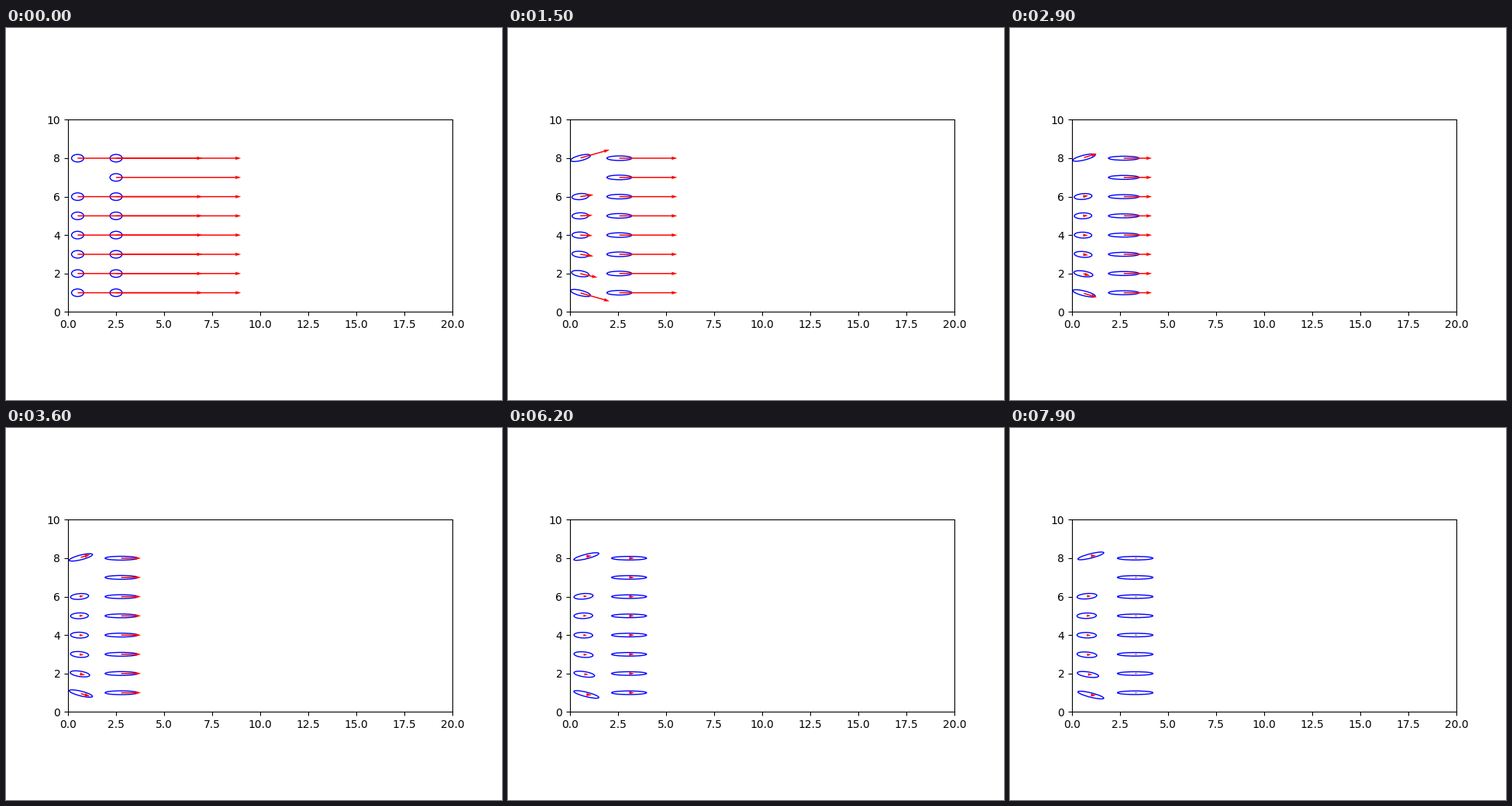
Recreate the animation shown at these times as a matplotlib script. Size 640 by 480 pixels, loop 8000 ms.

```python
import numpy as np
import matplotlib.pyplot as plt
from matplotlib.animation import FuncAnimation
from matplotlib.patches import Ellipse

STEPS = 80
DECAY = 0.95
V0 = 6.5       # shared starting speed
W0 = 0.633     # starting cell length
MIDDLE = 4.5   # row around which the left column is mirrored
n = np.arange(STEPS)


def free_velocity():
    return V0 * DECAY**n, np.zeros(STEPS), 0.0


def blocked_velocity(y):
    """Velocity behind the front column; outer rows slip past more easily."""
    offset = y - MIDDLE
    slip = abs(offset / 3.5)**3
    slope = 0.05 * offset + 0.075 * slip * np.sign(offset)
    amp = 2.75 + 1.45 * slip
    jolt = (V0 - amp) * (0.3 + 0.32 * slip)**n
    drift = (0.25 + 0.05 * slip) * (1 - np.exp(-n / 40))
    vx = amp * (0.9 + 0.03 * slip)**n + jolt + drift
    vy = slope * (0.88 * amp * DECAY**n + jolt)
    return vx, np.where(n > 0, vy, 0), np.arctan(slope)


def track(x, y, vx, vy, angle):
    """Position, length, heading and velocity of one cell at every step."""
    speed = np.hypot(vx, vy)
    length = W0 + 0.01 * (np.cumsum(speed) - speed[0])
    path = np.cumsum(0.01 * np.maximum(length - 0.58, 0))
    return np.array([x + path * np.cos(angle), y + path * np.sin(angle),
                     length, np.where(n > 0, angle, 0), vx, vy])


cells = np.array(
    [track(0.5, y, *blocked_velocity(y)) for y in range(1, 9) if y != 7]
    + [track(2.5, y, *free_velocity()) for y in range(1, 9)])

fig, ax = plt.subplots(figsize=(6.4, 4.8), dpi=100)
ax.set_aspect("equal")
ax.set_xlim(0, 20)
ax.set_ylim(0, 10)

bodies = [ax.add_patch(Ellipse((0, 0), 1, 1, fill=False, edgecolor="blue", lw=1))
          for _ in cells]
arrows = ax.quiver(*cells[:, [0, 1, 4, 5], 0].T, color="red", angles="xy",
                   scale_units="xy", scale=1, width=0.003, zorder=1.5)


def draw(i):
    x, y, length, angle, vx, vy = cells[:, :, i].T
    for body, cx, cy, w, a in zip(bodies, x, y, length, angle):
        body.set_center((cx, cy))
        body.width, body.height = w, 0.285 * w**-0.7
        body.angle = np.degrees(a)
    arrows.set_offsets(np.column_stack([x, y]))
    arrows.set_UVC(vx, vy)
    return [*bodies, arrows]


anim = FuncAnimation(fig, draw, frames=STEPS, interval=100,
                     repeat=True, repeat_delay=0)
plt.show()
```
